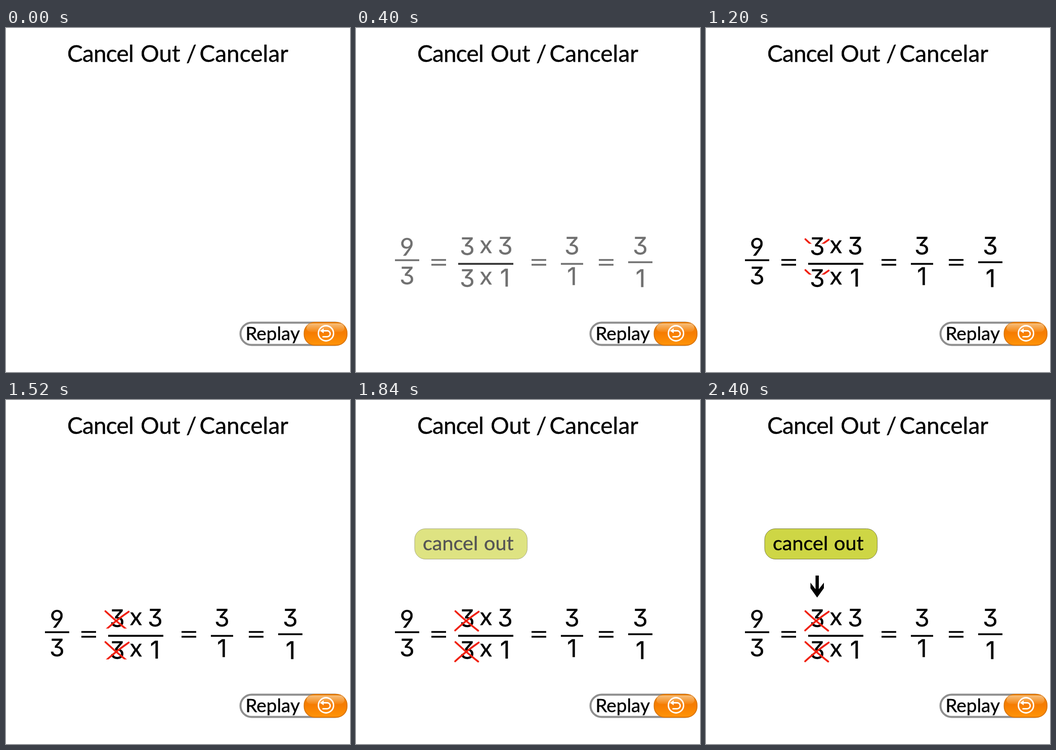
Write an HTML page that moves like this. It is 680x680 px and loops after 2.48 s.

```html
<!DOCTYPE html>
<html lang="en">
<head>
<meta charset="utf-8">
<title>Cancel Out</title>
<style>
  html, body { margin: 0; width: 100%; height: 100%; overflow: hidden; background: #fff; }
  svg { display: block; width: 100%; height: 100%; }
  text { font-family: Lato, sans-serif; stroke: #000; stroke-width: .4; }
  .math text { font-size: 48px; text-anchor: middle; }
  .math .flat { font-family: Inter, sans-serif; font-feature-settings: "cv09"; }
  .math path { stroke: #000; stroke-width: 3.5; }
</style>
</head>
<body>
<svg viewBox="0 0 680 680">
  <defs>
    <linearGradient id="orange" x2="0" y2="1">
      <stop offset="0" stop-color="#f08a10"/>
      <stop offset=".45" stop-color="#f67c00"/>
      <stop offset="1" stop-color="#ff9408"/>
    </linearGradient>
    <linearGradient id="gloss" x2="0" y2="1">
      <stop offset="0" stop-color="#fff" stop-opacity=".45"/>
      <stop offset="1" stop-color="#fff" stop-opacity=".05"/>
    </linearGradient>
    <clipPath id="wipe"><rect id="wipeBox" x="185" y="414" width="70" height="0"/></clipPath>
    <g id="cross" clip-path="url(#wipe)">
      <path d="M196.500 417.500Q217 437 241.500 456M196 455.500Q218 435 242.500 418.500"
            fill="none" stroke="#f02010" stroke-width="3.6" stroke-linecap="round"/>
    </g>
  </defs>

  <text y="67" font-size="46"><tspan x="121" letter-spacing="-.8">Cancel</tspan><tspan x="266">Out</tspan><tspan x="356">/</tspan><tspan x="382.500">Cancelar</tspan></text>

  <g id="equation" class="math" opacity="0"></g>
  <use href="#cross"/>
  <use href="#cross" y="61"/>

  <g id="label" opacity="0">
    <rect x="116" y="254.500" width="222.500" height="60" rx="21" fill="#ced645" stroke="#73773f" stroke-width=".9"/>
    <text y="297" font-size="39.500"><tspan x="132">cancel</tspan><tspan x="253">out</tspan></text>
  </g>

  <path id="arrow" opacity="0" d="M216.500 347h6.500v27l10-13v11l-13.300 18.500l-13.200-18.500v-11l10 13z"/>

  <g id="replay">
    <rect x="463.500" y="582.500" width="209" height="44" rx="22" fill="#fff" stroke="#8e8e8e" stroke-width="4"/>
    <text x="473.500" y="617" font-size="36.800">Replay</text>
    <rect x="589.500" y="582" width="84.500" height="45" rx="21" fill="url(#orange)" stroke="#dd7505" stroke-width="2"/>
    <rect x="594" y="584" width="75" height="17" rx="8.500" fill="url(#gloss)"/>
    <g fill="none" stroke="#fff" stroke-width="2.800">
      <circle cx="632.500" cy="603.500" r="15"/>
      <path d="M626 598.500h9a5.900 5.900 0 0 1 0 11.800h-9.500"/>
      <path d="M628 593.500v10l-7.500-5z" fill="#fff" stroke="none"/>
    </g>
  </g>
</svg>
<script>
  const byId = id => document.getElementById(id);

  // Each glyph is centred on x and stands on baseline y.
  const glyph = (char, x, y, style = "flat") =>
    `<text class="${style}" x="${x}" y="${y}">${char}</text>`;
  const bar = (x, y, width) => `<path d="M${x} ${y}h${width}"/>`;
  const equals = x => bar(x, 458.5, 29) + bar(x, 468, 29);

  byId("equation").innerHTML = [
    glyph(9, 101, 450, "round"), bar(77, 459, 48), glyph(3, 101, 507),
    equals(149),
    glyph(3, 220, 449), glyph("x", 257, 444.5, "round"), glyph(3, 295, 448),
    bar(202, 466.3, 109), bar(202, 466.3, 109),
    glyph(3, 220, 512), glyph("x", 257, 507, "round"), glyph(1, 294.5, 511),
    equals(347),
    glyph(3, 427, 448), bar(405, 466.3, 44), glyph(1, 427, 508),
    equals(480),
    glyph(3, 562, 448), bar(538, 463, 48), glyph(1, 562.5, 511.5)
  ].join("");

  const LOOP = 2480, STEP = 80;
  const progress = (time, start, end) =>
    Math.min(1, Math.max(0, (time - start) / (end - start)));

  function draw(now) {
    const time = Math.floor((now % LOOP) / STEP) * STEP;
    const arrow = progress(time, 1920, 2400);
    byId("equation").setAttribute("opacity", 1);
    for (const part of byId("equation").children) part.setAttribute("opacity", progress(time, 0, 720));
    byId("wipeBox").setAttribute("height", 44 * progress(time, 1040, 1600));
    byId("label").setAttribute("opacity", progress(time, 1520, 2000));
    byId("arrow").setAttribute("opacity", arrow);
    byId("arrow").setAttribute("transform", `translate(0 ${27 * (arrow - 1)})`);
  }

  const start = performance.now();
  function tick() {
    draw(performance.now() - start);
    requestAnimationFrame(tick);
  }
  tick();
</script>
</body>
</html>
```
